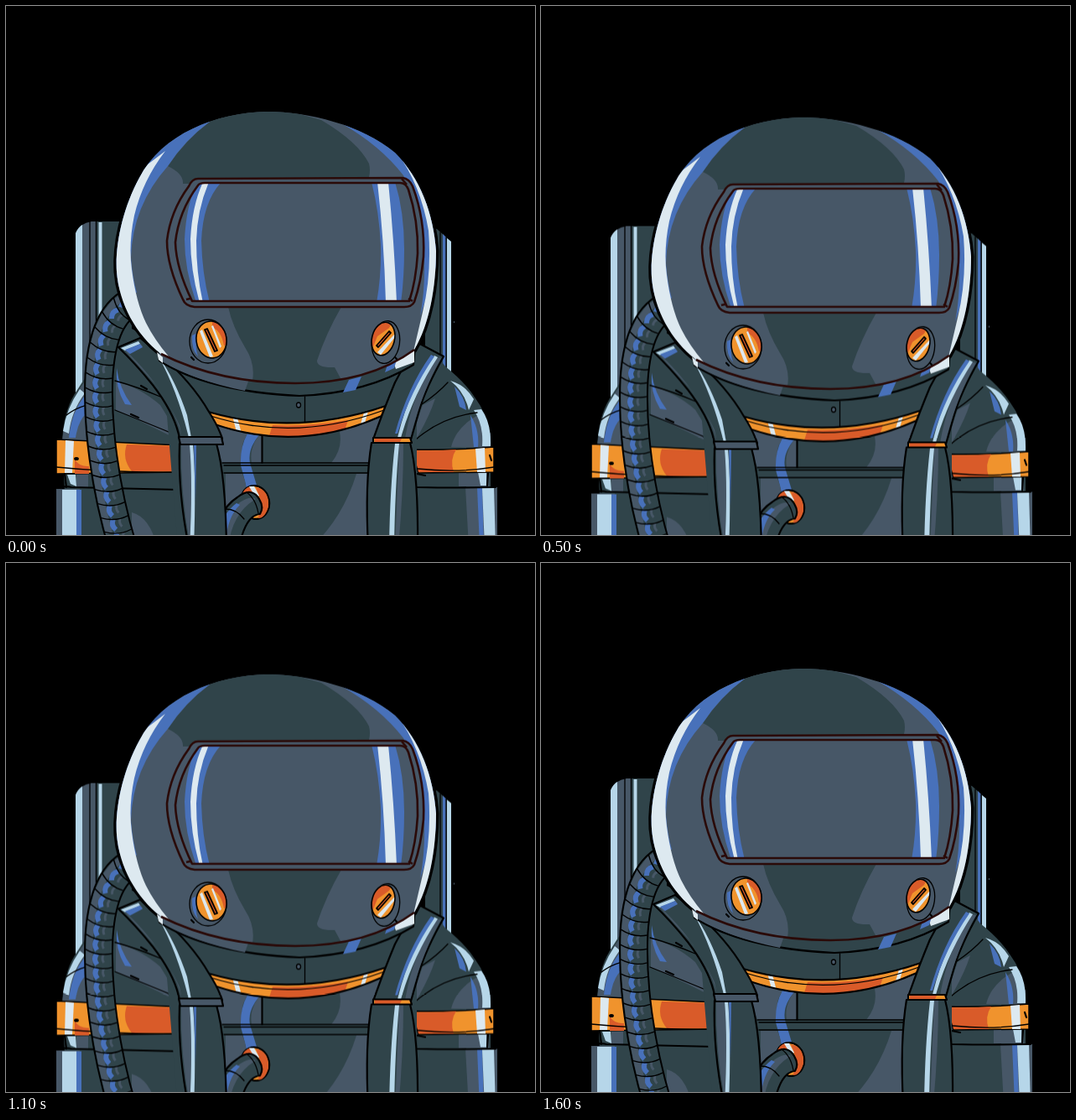
Animation, 631 px wide and 631 px high, one loop 1.7 s. Source, as an HTML page:

```html
<!DOCTYPE html>
<html lang="en">
<head>
<meta charset="utf-8">
<title>Astronaut</title>
<style>
  html, body { margin: 0; width: 100%; height: 100%; overflow: hidden; background: #000; }
  svg { display: block; width: 100vw; height: 100vh; }
  path, ellipse, rect { fill: none; }
  .d { fill: #30444a; }
  .s { fill: #475767; }
  .b { fill: #4871ba; }
  .l { fill: #b6d6e9; }
  .w { fill: #dde9f0; }
  .o { fill: #f0932d; }
  .r { fill: #d95b29; }
  .k { stroke: #000; stroke-width: 2.2; stroke-linejoin: round; stroke-linecap: round; }
  .t { stroke: #000; stroke-width: 1.3; stroke-linecap: round; }
  .v { stroke: #2a0a08; stroke-width: 2.6; stroke-linejoin: round; }
</style>
</head>
<body>
<svg viewBox="0 0 631 631" preserveAspectRatio="none">
<defs>
  <path id="helmetShape" d="M312 126C250 127 186 153 159 205C139 242 130 285 132 317C135 355 155 392 185 415C235 440 290 450 345 450C400 450 450 437 487 410C505 380 513 335 513 292C510 248 494 205 464 175C425 142 360 126 312 126Z"/>
  <path id="glassShape" d="M237 211L470 211Q477 211 480 219Q492 256 491 295Q489 328 481 352L222 352Q203 313 202 282Q206 245 229 214Q231 211 237 211Z"/>
  <path id="hoseShape" d="M160 349C126 358 114 395 111 440C108 500 118 575 139 645"/>
  <clipPath id="helmetClip"><use href="#helmetShape"/></clipPath>
  <clipPath id="glassClip"><use href="#glassShape"/></clipPath>
  <clipPath id="bandClip"><path d="M241 484Q345 514 453 477L448 489Q350 533 249 499Z"/></clipPath>
  <clipPath id="knobL"><ellipse cx="245" cy="398" rx="18" ry="22" transform="rotate(-8 245 398)"/></clipPath>
  <clipPath id="knobR"><ellipse cx="450" cy="397" rx="13.500" ry="20" transform="rotate(14 450 397)"/></clipPath>
</defs>

<g class="body">
  <!-- backpack -->
  <path class="s" d="M83 271Q88 259 102 257H150V470H83Z"/>
  <path class="l" d="M83 271Q86 264 91 261V470H83Z"/>
  <path class="d" d="M107 257H150V470H107Z"/>
  <path class="l" d="M110.500 258H114.500V400H110.500Z"/>
  <path class="t" d="M100 257V460M107.500 257V450"/>
  <path class="d" d="M500 262L514 266L531 281V447L500 430Z"/>
  <path class="b" d="M521 272L525 276V440H521Z"/>
  <path class="l" d="M526 277L531 281V447L526 443Z"/>
  <path class="t" d="M518 270V420M525 276V443"/>
  <rect class="s" x="534" y="376" width="1" height="2"/>

  <!-- left arm -->
  <path class="d" d="M150 385L125 412Q98 435 85 458Q68 482 67 522L70 580H210V515L180 400Z"/>
  <path class="s" d="M95 447Q71 476 67 520H96Z"/>
  <path class="l" d="M88 457Q72 480 68 507L75 510Q78 483 94 462Z"/>
  <path class="b" d="M93 466L97 485Q86 494 83 515H75Q78 485 93 466Z"/>
  <path class="s" d="M131 448Q160 455 184 476L206 512V518Q168 498 131 482Z"/>
  <path class="b" d="M132 432Q135 456 150 476L142 475Q130 455 132 432Z"/>
  <path class="t" d="M130 447Q156 454 184 466M130 482Q160 494 206 513M96 476Q82 480 72 488"/>
  <path class="k" d="M161 453L168 457M149 487L158 491"/>
  <path class="d" d="M70 556H207V578H70Z"/>
  <path class="l" d="M73 559H83L84 573L77 570Z"/>
  <path class="s" d="M84 559H98V574H84Z"/>
  <path class="o k" d="M60 517L207 524V556L60 558Z" style="stroke-width:1.500"/>
  <path class="r" d="M144 523L207 525V555H150Q138 540 144 523ZM82 541Q88 550 99 549V558H82Z"/>
  <path class="w" d="M71 518L81 519L79 557H70Z"/>
  <path class="t" d="M60 550Q130 557 207 556"/>
  <ellipse class="k" cx="84" cy="540" rx="1.800" ry="1"/>
  <path class="d" d="M60 576L207 577V645H60Z"/>
  <path class="s" d="M60 576H88V645H60Z"/>
  <path class="l" d="M67 577H84V645H67Z"/>
  <path class="b" d="M84 577H90V645H84Z"/>
  <path class="s" d="M150 604Q172 610 180 645H150Z"/>
  <path class="k" d="M62 575Q70 572 78 574L207 577M70 558L72 574M206 557V645"/>

  <!-- right arm -->
  <path class="d" d="M505 405L524 430Q548 449 560 468Q578 492 578 526V575H486V480Z"/>
  <path class="s" d="M497 476L512 468Q505 490 489 517L487 525V505Z"/>
  <path class="s" d="M531 526Q537 502 563 488L578 510V527Z"/>
  <path class="l" d="M530 447Q548 452 558 469L552 482Q547 460 530 447ZM558 482L567 481Q579 497 578 525H568Q570 500 558 482Z"/>
  <path class="b" d="M535 454Q547 465 549 482L541 478ZM554 488Q565 505 563 526H558Z"/>
  <path class="t" d="M496 475Q514 463 527 449M489 517Q520 490 562 485"/>
  <path class="d" d="M490 555H576V575H490Z"/>
  <path class="s" d="M540 556H576V573H540Z"/>
  <path class="l" d="M563 556H573V572H566Z"/>
  <path class="o k" d="M485 529Q535 530 582 526V556L492 557Z" style="stroke-width:1.500"/>
  <path class="r" d="M486 530Q515 531 537 529Q529 541 534 556H492Z"/>
  <path class="w" d="M560 528L571 527L572 556H562Z"/>
  <path class="t" d="M491 552Q540 557 582 550"/>
  <path class="k" d="M577 536L579 542M490 558L500 560"/>
  <path class="d" d="M490 574H586V645H490Z"/>
  <path class="s" d="M548 574H586V645H552Z"/>
  <path class="b" d="M562 574H568L570 645H565Z"/>
  <path class="l" d="M568 575H582L584 645H571Z"/>
  <path class="k" d="M490 574Q540 575 584 574M489 558V574M575 557L574 572"/>

  <!-- chest -->
  <path class="d" d="M185 405H490V645H205Z"/>
  <path class="s" d="M240 490L290 508Q276 525 285 545H258ZM398 508L450 485L434 545H388Q402 528 398 508Z"/>
  <path class="b" d="M288 510L302 512Q288 528 291 545L300 575L290 590Q285 565 280 548Q279 526 288 510Z"/>
  <path class="s" d="M301 513H306V545H293Q290 528 301 513Z"/>
  <path class="s" d="M418 558H434V645H365Q402 610 418 558Z"/>
  <path class="s" d="M262 558H282Q290 575 284 590L262 602Z"/>
  <path class="t" d="M258 545H434M260 548H434M260 557H434"/>
  <path class="k" d="M305.500 512V545"/>
  <path class="t" d="M356.500 466V496"/>
  <ellipse class="s t" cx="349" cy="476" rx="2.500" ry="3"/>
  <g clip-path="url(#bandClip)">
    <path class="o" d="M235 470H460V525H235Z"/>
    <path class="r" d="M318 500Q360 502 408 494L398 525H310Z"/>
    <path class="w" d="M270 489L276 491L281 510L275 508ZM428 482L433 480L426 504L421 505Z"/>
  </g>
  <path class="k" d="M241 484Q345 514 453 477L448 489Q350 533 249 499Z"/>
  <path class="t" d="M244 489Q345 521 451 482"/>

  <!-- chest pipe -->
  <ellipse class="o k" cx="297" cy="592" rx="17" ry="20" transform="rotate(-12 297 592)"/>
  <path class="r" d="M298 574Q314 577 313 597Q309 611 301 611L304 590ZM281 584Q284 575 291 573L296 580Z"/>
  <path class="w" d="M290 573L296 573L302 584L298 587Z"/>
  <path class="d k" d="M248 645Q251 602 276 586Q293 573 302 588Q308 598 303 606Q286 607 278 645Z"/>
  <path class="s" d="M257 640Q257 609 279 592Q291 584 298 588Q270 604 265 645Z"/>
  <path class="b" d="M254 631Q257 606 275 593L279 595Q264 609 262 640Z"/>
  <path class="t" d="M262 600Q275 600 284 612M287 580Q298 588 301 605"/>

  <!-- straps -->
  <path class="d k" d="M134 407L160 396L182 414Q222 449 242 484Q253 501 258 516H207Q202 487 175 452Q155 427 134 407Z"/>
  <path class="s" d="M139 408L158 400L163 406L147 415Q185 452 207 500L210 515Q203 484 178 451Z"/>
  <path class="l" d="M137 408L158 400L160 403L142 411ZM182 418Q202 446 216 488L221 515H218Q205 460 182 418Z"/>
  <path class="b" d="M142 410L160 403L163 407L148 415Z"/>
  <path class="d k" d="M207 522H251Q262 560 263 645H218Q205 580 207 522Z"/>
  <path class="s" d="M209 523H219Q223 570 219 640Q208 580 209 523Z"/>
  <path class="l" d="M219 523H223Q227 570 224 645H219Q223 570 219 523Z"/>
  <path class="b" d="M224 523H227L226 592Z"/>
  <path class="s k" d="M206 514H257L259 523H208Z"/>

  <path class="d k" d="M490 401L522 418Q501 455 493 482L483 517H438Q451 480 464 449Z"/>
  <path class="s" d="M513 419L519 420Q496 460 482 516H476Q484 465 513 419Z"/>
  <path class="l" d="M511 417L515 419Q485 465 471 515H467Q480 459 511 417Z"/>
  <path class="b" d="M507 416L511 418Q482 460 467 510H464Q479 455 507 416Z"/>
  <path class="d k" d="M436 521H482Q492 560 491 645H432Q428 570 436 521Z"/>
  <path class="s" d="M469 522H474Q474 580 468 645H464Z"/>
  <path class="l" d="M464 522H469Q464 575 463 645H457Q458 575 464 522Z"/>
  <path class="o k" d="M438 515H482L484 521H438Z"/>
  <path class="r" d="M440 516H472L470 520H440Z"/>

  <!-- breathing hose -->
  <g id="hose"></g>
</g>

<use class="head" href="#helmetShape" stroke="#000" stroke-width="7"/>

<g class="body">
  <!-- neck ring -->
  <path class="d k" d="M180 405L183 423Q240 460 350 465Q430 462 486 428L488 405Z"/>
  <path class="s" d="M181 410L186 424Q225 447 285 459L290 445L200 415Z"/>
  <path class="w" d="M180 413L187 419V426L182 422ZM462 424L487 410V425L465 433Z"/>
  <path class="b" d="M409 446L424 442L417 458L402 461ZM455 428L466 422L463 432L452 437Z"/>
</g>

<g class="head">
  <!-- helmet -->
  <g clip-path="url(#helmetClip)">
    <path class="s" d="M120 115H525V460H120Z"/>
    <path class="d" d="M243 138L300 115L376 136Q420 162 433 188Q436 200 430 212H211Q212 200 193 191Q214 160 243 138Z"/>
    <path class="d" d="M265 359H400Q382 390 371 423Q371 432 392 431L405 455H292Q300 430 285 407Q270 382 265 359Z"/>
    <path class="b" d="M243 138Q213 160 193 191Q151 238 149 300Q151 325 156 342L120 330V200L200 120Z"/>
    <path class="w" d="M190 173Q163 208 153 250Q146 284 150 314Q155 353 167 378Q177 398 194 418L160 420L115 340V230Z"/>
    <path class="b" d="M400 140Q446 166 474 202Q498 245 499 300Q500 340 494 370L520 290V200L440 130Z"/>
    <path class="w" d="M466 174Q495 214 504 268Q508 320 497 365L486 412L510 405L530 290Q515 210 470 172Z"/>
  </g>
  <path class="v" d="M185 415C235 440 290 450 345 450C400 450 450 437 487 410"/>
  <path class="k" d="M221 419L224 422M464 419L466 421"/>

  <!-- visor -->
  <path class="s v" d="M229 206L473 205Q481 206 485 215Q500 255 498 299Q495 330 487 353Q484 359 475 359H225Q214 358 211 350Q192 310 192 280Q196 245 218 215Q222 206 229 206Z"/>
  <g clip-path="url(#glassClip)">
    <path class="b" d="M228 210H257Q235 233 233 280Q234 320 243 354H227Q213 315 213 278Q215 238 228 210Z"/>
    <path class="w" d="M235 210H242Q228 243 227 280Q227 320 235 354H231Q220 315 220 278Q222 238 235 210Z"/>
    <path class="b" d="M436 210H464Q475 245 475 290Q475 325 471 354H442Q448 320 447 285Q445 245 436 210Z"/>
    <path class="w" d="M443 210H456Q463 280 466 354H453Q451 280 443 210Z"/>
  </g>
  <use href="#glassShape" class="v"/>
  <path class="v" d="M215 350L220 349M472 206L478 213M480 349L485 352"/>

  <!-- knobs -->
  <ellipse class="s t" cx="241" cy="400" rx="22" ry="26"/>
  <path class="b" d="M222 393Q221 410 229 418Q225 407 228 390Z"/>
  <g clip-path="url(#knobL)">
    <path class="o" d="M220 370H270V425H220Z"/>
    <path class="r" d="M246 374H270V402L260 405Q257 388 246 383Z"/>
    <path class="w" d="M231 388L234 386L247 418L243 419ZM245 382L247 381L257 406L255 408Z"/>
  </g>
  <ellipse class="k" cx="245" cy="398" rx="18" ry="22" transform="rotate(-8 245 398)" style="stroke-width:1.600"/>
  <path class="r k" d="M237 386L240 385L252 411L249 412Z" style="stroke-width:1.800"/>
  <ellipse class="s t" cx="453" cy="401" rx="16.500" ry="25.500" transform="rotate(8 453 401)"/>
  <g clip-path="url(#knobR)">
    <path class="o" d="M430 370H475V425H430Z"/>
    <path class="r" d="M438 380L462 374L457 384L443 394L438 406L433 405Z"/>
    <path class="w" d="M443 413L464 391V395L447 416Z"/>
  </g>
  <ellipse class="k" cx="450" cy="397" rx="13.500" ry="20" transform="rotate(14 450 397)" style="stroke-width:1.600"/>
  <path class="r k" d="M442 405L457 388L459 390L444 407Z" style="stroke-width:1.800"/>
</g>
</svg>
<script>
const hose = document.getElementById('hose');
const spine = document.getElementById('hoseShape');

function addPath(d, stroke, width) {
  const p = document.createElementNS('http://www.w3.org/2000/svg', 'path');
  p.setAttribute('d', d);
  p.style.cssText = `stroke:${stroke};stroke-width:${width}`;
  hose.append(p);
}

// Point at a distance along the hose, moved sideways (positive = right-hand side).
function at(s, side) {
  const a = spine.getPointAtLength(s);
  const b = spine.getPointAtLength(s + 1);
  const c = spine.getPointAtLength(s - 1);
  const len = Math.hypot(b.x - c.x, b.y - c.y);
  const x = a.x - (b.y - c.y) / len * side;
  const y = a.y + (b.x - c.x) / len * side;
  return x.toFixed(1) + ' ' + y.toFixed(1);
}

const line = spine.getAttribute('d');
const total = spine.getTotalLength();
addPath(line, '#000', 35);
addPath(line, '#30444a', 31);

const ribs = [];
for (let s = 10; s < total - 4; s += 17) ribs.push(s);
addPath('M' + ribs.map(s => at(s, 11)).join('L'), '#475767', 8);
for (const s of ribs) {
  addPath(`M${at(s + 2, 2)}Q${at(s + 8, 7)} ${at(s + 15, 2)}`, '#4871ba', 6);
  addPath(`M${at(s + 3, -6)}Q${at(s + 8, -3)} ${at(s + 13, -6)}`, '#475767', 3);
}
for (const s of ribs) addPath(`M${at(s - 3, 16)}Q${at(s + 6, 0)} ${at(s + 2, -16)}`, '#000', 1.4);

// Sink for eight steps, rise for eight; the head travels further than the body.
const STEPS = 17, STEP_MS = 100;

function bob(selector, drop) {
  const poses = Array.from({ length: STEPS + 1 }, (_, i) => ({
    offset: i / STEPS,
    easing: 'steps(1, end)',
    transform: `translateY(${drop * (8 - Math.abs(8 - i % STEPS))}px)`
  }));
  for (const el of document.querySelectorAll(selector)) {
    el.animate(poses, { duration: STEPS * STEP_MS, iterations: Infinity });
  }
}

bob('.body', 1.1);
bob('.head', 1.36);
</script>
</body>
</html>
```
